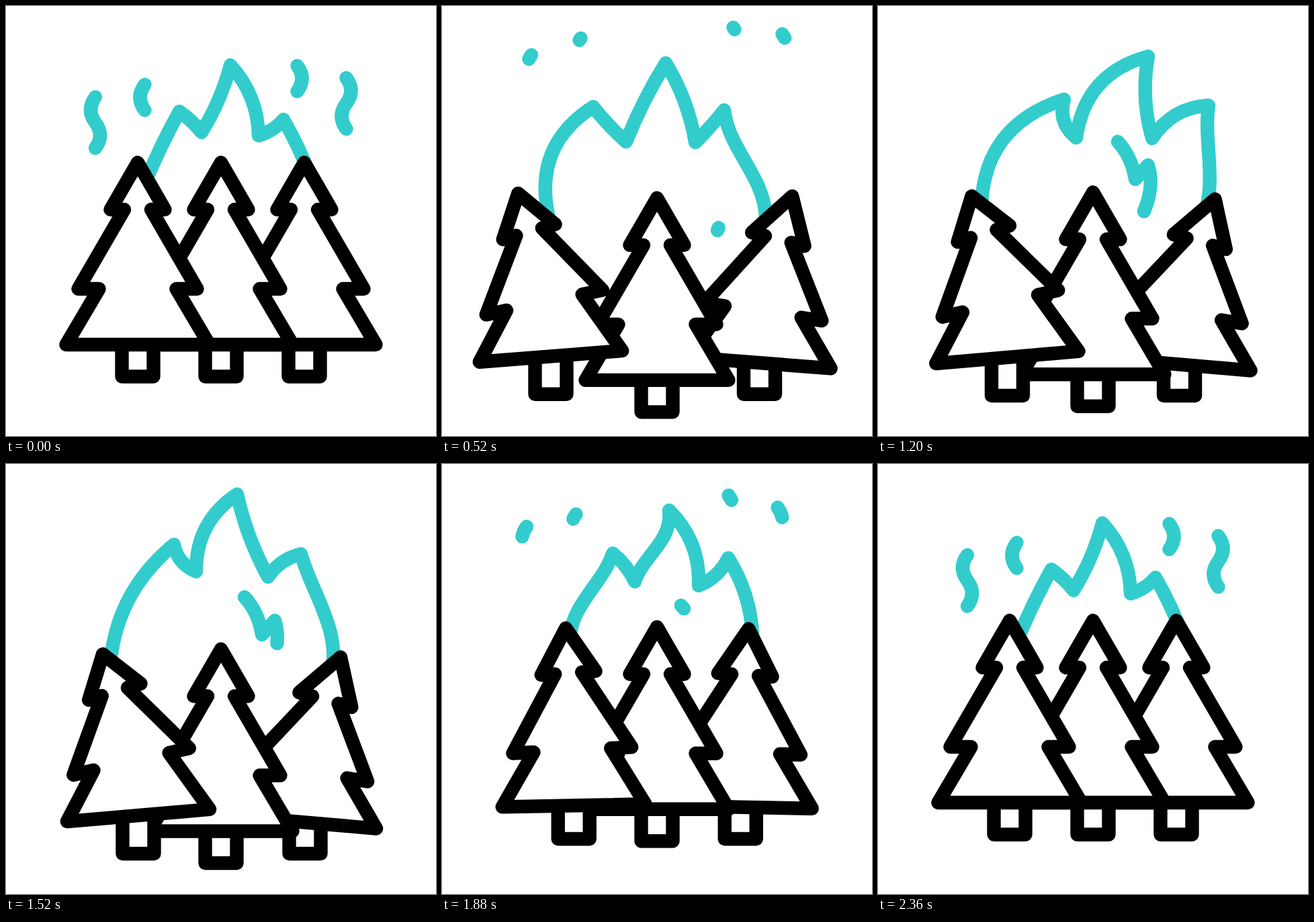
Write an HTML page that moves like this. It is 640 px wide and 640 px high and loops after 2.4 s.

```html
<!DOCTYPE html>
<html lang="en">
<head>
<meta charset="utf-8">
<title>Forest fire</title>
<style>
  html, body { margin: 0; width: 100%; height: 100%; overflow: hidden; background: #fff; }
  svg { display: block; width: 100vw; height: 100vh; }
  path { stroke-width: 20.4; stroke-linecap: round; stroke-linejoin: round; fill: none; }
  #fire path { stroke: #33cccd; }
  #trees path { stroke: #000; fill: #fff; }
</style>
</head>
<body>
<svg viewBox="0 0 640 640"><g id="fire"></g><g id="trees"></g></svg>
<script>
const LOOP = 2400, STEP = 40;

const add = (parent, d = '') => {
  const p = document.createElementNS('http://www.w3.org/2000/svg', 'path');
  p.setAttribute('d', d);
  return document.getElementById(parent).appendChild(p);
};
const ramp = (t, a, b) => Math.min(1, Math.max(0, (t - a) / (b - a)));
const ease = (t, a, b) => { const x = ramp(t, a, b); return x * x * (3 - 2 * x); };
const mix = (a, b, k) => a + (b - a) * k;
const mixPoint = (p, q, k) => p.map((v, i) => mix(v, q[i], k));
const fmt = p => p.map(v => v.toFixed(2)).join();

// Lines that are partly shown, from a to b (0..1).
const line = d => {
  const p = add('fire', d);
  p.setAttribute('pathLength', 1);
  return p;
};
function trim(path, a, b) {
  path.style.visibility = b - a > 0.001 ? 'visible' : 'hidden';
  path.setAttribute('stroke-dasharray', `${Math.max(0, b - a)} 3`);
  path.setAttribute('stroke-dashoffset', -a);
}
const move = (el, x, y) => el.setAttribute('transform', `translate(${x} ${y})`);

// Flame: time, three tips with two notches between, then curl of the tongues,
// bulge of the left and right flank, and twist (+ left edges, - right flank).
const poses = [
  [0,    258, 157, 291, 188, 334, 88, 376, 193, 413, 169,  .1,  .02, .03, 0],
  [520,  225, 150, 274, 202, 333, 85, 377, 203, 420, 155,  .02, .23, .01, -.1],
  [840,  260, 143, 291, 200, 378, 77, 405, 199, 469, 147,  .15, .12, .2,  .22],
  [1200, 277, 139, 295, 196, 402, 75, 408, 197, 492, 148, -.17, .25, .04, -.07],
  [1520, 250, 120, 283, 160, 344, 45, 390, 168, 439, 134, -.13, .15, .09, -.08],
  [1880, 254, 133, 287, 175, 338, 69, 382, 181, 426, 140,  .13, .1,  .1,  .13]
];
poses.push([2360, ...poses[0].slice(1)]);

// Smooth curve through the poses, at rest at both ends.
function poseAt(t) {
  const slope = (i, j) => {
    const a = poses[i - 1], b = poses[i + 1];
    return a && b ? (b[j] - a[j]) / (b[0] - a[0]) : 0;
  };
  const i = poses.findLastIndex((p, n) => p[0] <= t && n < poses.length - 1);
  const a = poses[i], b = poses[i + 1], h = b[0] - a[0], x = ramp(t, a[0], b[0]), y = 1 - x;
  return a.map((v, j) => v * y * y * (1 + 2 * x) + b[j] * x * x * (3 - 2 * x) +
    h * x * y * (slope(i, j) * y - slope(i + 1, j) * x));
}

// Cubic from p to q, its handles pushed sideways by shares of the length.
function bow(p, q, bulge, twist = 0) {
  const [dx, dy] = [q[0] - p[0], q[1] - p[1]];
  const handle = (f, o) => [p[0] + dx * f + dy * o, p[1] + dy * f - dx * o];
  return 'C' + [handle(1 / 3, bulge + twist), handle(2 / 3, bulge - twist), q].map(fmt).join(' ');
}

function flameAt(t, bend) {
  const pose = poseAt(t), [curl, left, right, twist] = pose.slice(11);
  const pts = [
    mixPoint([204, 270], [154, 314], bend),
    ...[1, 3, 5, 7, 9].map(i => pose.slice(i, i + 2)),
    mixPoint([456, 262], [484, 316], bend)
  ];
  const wave = Math.max(0, twist);
  const bows = [
    [left, wave], [curl - .05], [.05 - curl, wave],
    [.05 + .75 * curl], [-curl], [right, Math.min(0, twist)]
  ];
  return 'M' + fmt(pts[0]) + bows.map((b, i) => bow(pts[i], pts[i + 1], ...b)).join('');
}

const flame = add('fire');
const spark = line('M357,202Q378,225 383,258L402,237Q412,268 396,306');

// Smoke: half waves, 38 high; side -1 mirrors them.
const wisp = (x, y, side, second, rise) =>
  ({ path: line(`M${x},${y}q${-14 * side},19 0,38${second ? 't0,38' : ''}`), rise });
const wisps = [
  wisp(133, 135.5, 1, true, 68), wisp(206.5, 117, 1, false, 75),
  wisp(433.5, 89, -1, false, 62), wisp(506.5, 107, -1, true, 71)
];

// Tree: half widths at heights above the base line.
const TALL = 271, BASE = 504;
const half = [[0, TALL], [40.5, 201], [20, 201], [88.5, 83], [57.5, 83], [106.5, 0]];

// lean: direction of bending; curl: how the bend spreads along the spine.
function tree({ x, lean, curl, squash, dx, back, drop, rebound, trunkDrop }) {
  const trunk = add('trees', `M${x - 23.5},495V551.5H${x + 23.5}V495`);
  const crown = add('trees');
  return (bend, slide) => {
    const shift = bend * (dx + back * slide), sink = bend * rebound * slide;
    const point = (w, h) => {
      const u = h / TALL, tilt = lean * bend * (.085 + .255 * u ** curl);
      return [
        x + shift - lean * bend * 53 * u ** (curl + .87) + w * Math.cos(tilt),
        BASE + bend * drop + sink - h + bend * squash * u ** (1 / curl) - w * Math.sin(tilt)
      ];
    };
    const outline = [
      ...half.map(([w, h]) => point(-w, h)),
      ...half.slice(1).reverse().map(([w, h]) => point(w, h))
    ];
    crown.setAttribute('d', `M${outline.map(fmt).join('L')}Z`);
    move(trunk, shift, bend * trunkDrop + sink);
  };
}

const trees = [
  { x: 444, lean: -1, curl: 1, squash: 25, dx: 31, back: -30, drop: 29.5, rebound: 0, trunkDrop: 28.5 },
  { x: 320, lean: 0, curl: 1, squash: 0, dx: 0, back: 0, drop: 57.5, rebound: -15, trunkDrop: 57.5 },
  { x: 196, lean: 1, curl: .5, squash: 31, dx: -37, back: 38, drop: 19, rebound: 0, trunkDrop: 28.5 }
].map(tree);

function draw(t) {
  const slide = ease(t, 800, 1310), back = ease(t, 1590, 2010);
  const up = ease(t, 0, 630), bend = up * (1 - back);
  trees.forEach(pose => pose(bend, slide));
  flame.setAttribute('d', flameAt(t, bend));

  trim(spark, 1 - ramp(t, 510, 900), 1 - ramp(t, 1410, 1900));
  move(spark, ...mixPoint(mixPoint([14, 28], [-2, -4], slide), [-1, 12], back));

  const again = ramp(t, 1760, 2360), late = t > 1200;
  for (const { path, rise } of wisps) {
    trim(path, 0, late ? again : 1 - up);
    if (late) move(path, -8.7 * (1 - again), -53 * (1 - again));
    else move(path, 0, -rise * up);
  }
}

const start = performance.now();
function tick() {
  const t = (performance.now() - start) % LOOP;
  draw(Math.floor(t / STEP) * STEP);
  requestAnimationFrame(tick);
}
tick();
</script>
</body>
</html>
```
